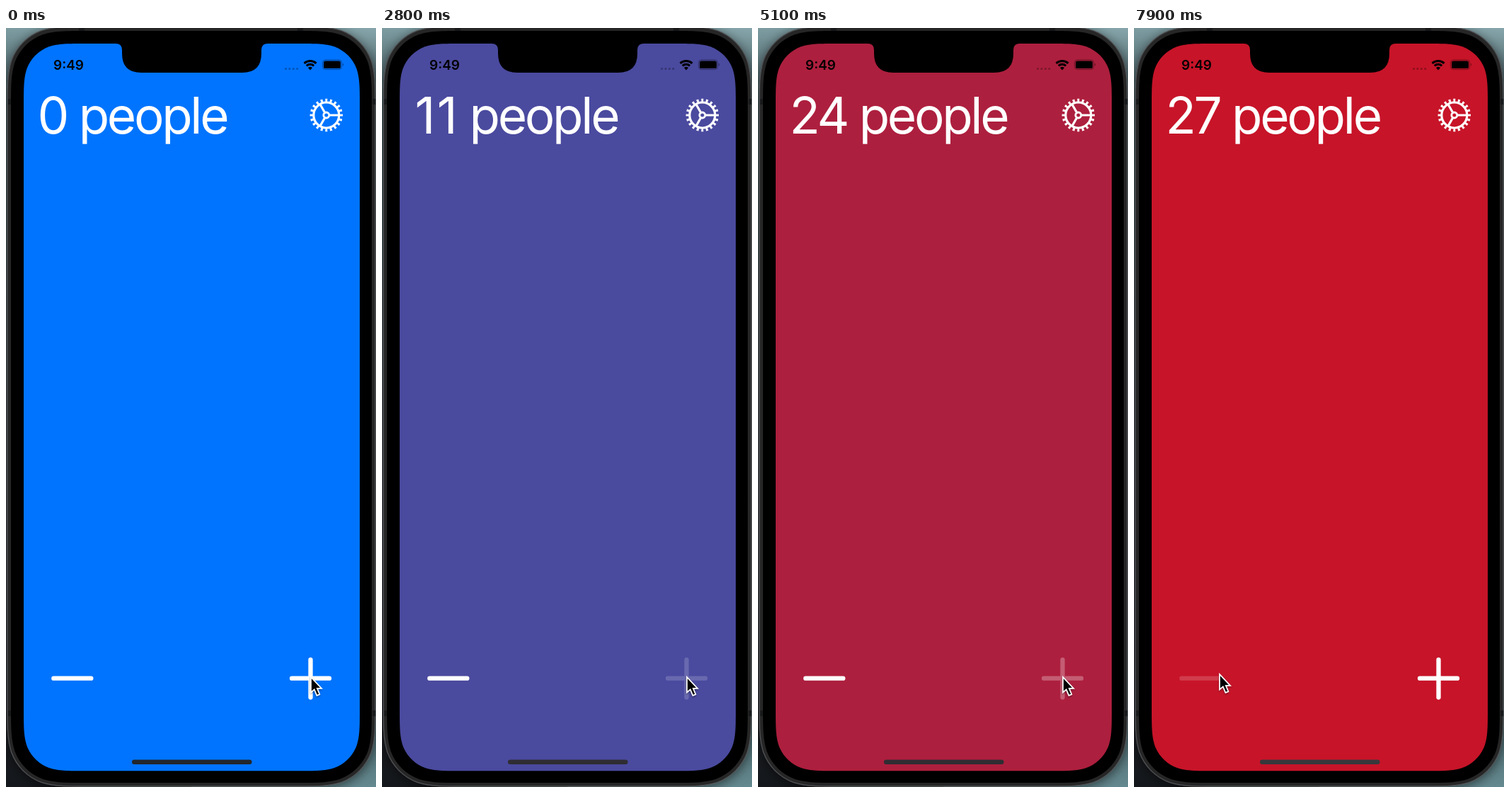
Recreate the animation shown at these times as an HTML page. Size 523 px wide and 1071 px high, loop 8 s.

```html
<!DOCTYPE html>
<html lang="en">
<head>
<meta charset="utf-8">
<style>
  html, body { margin: 0; width: 523px; height: 1071px; overflow: hidden; background: #000; }
  svg { display: block; }
  text { font-family: Inter, sans-serif; }
  #title { font-size: 71px; letter-spacing: -3.3px; fill: #fff; }
  #title tspan { letter-spacing: .3px; }
  #clock { font-size: 19px; font-weight: 600; }
  .white { stroke: #fff; fill: none; }
  .button { stroke-width: 6.3; stroke-linecap: round; }
</style>
</head>
<body>
<svg width="523" height="1071" viewBox="0 0 523 1071">
  <defs>
    <linearGradient id="left" x2="0" y2="1">
      <stop stop-color="#7d9da2"/><stop offset=".1" stop-color="#3a4c52"/>
      <stop offset=".6" stop-color="#3a3c42"/><stop offset="1" stop-color="#14171b"/>
    </linearGradient>
    <linearGradient id="right" x2="0" y2="1">
      <stop stop-color="#86a6ab"/><stop offset=".1" stop-color="#33464c"/>
      <stop offset=".8" stop-color="#2c3f45"/><stop offset="1" stop-color="#64898f"/>
    </linearGradient>
    <filter id="glow" x="-10%" y="-10%" width="120%" height="120%">
      <feDropShadow dx="0" dy="3" stdDeviation="8" flood-opacity=".55"/>
    </filter>
    <filter id="shadow" x="-50%" y="-50%" width="200%" height="200%">
      <feDropShadow dx="0" dy="1.5" stdDeviation="1.3" flood-opacity=".4"/>
    </filter>
  </defs>

  <rect width="262" height="1071" fill="url(#left)"/>
  <rect x="262" width="261" height="1071" fill="url(#right)"/>
  <path id="frame" fill="#262728" stroke="#505153" stroke-width="1.3" filter="url(#glow)"/>
  <path d="M103 0h8v4h-8zM412 0h8v4h-8zM3 100h4v8h-4zM518 100h4v8h-4zM3 963h4v8h-4zM518 963h4v8h-4z" fill="#18191a"/>
  <path id="bezel"/>
  <path id="screen"/>
  <path d="M155 21V22Q164 22 164 31V36Q164 63 191 63H334Q361 63 361 36V31Q361 22 370 22V21Z"/>

  <text id="clock" x="67" y="59">9:49</text>
  <path d="M395.5 57.5H413" stroke="#000" stroke-width="3.2" stroke-linecap="round" stroke-dasharray="0 5.4" opacity=".28"/>
  <g fill="none" stroke="#000" stroke-width="3">
    <path d="M421.5 49.9A12.5 12.5 0 0 1 438.5 49.9M424.8 53.4A7.6 7.6 0 0 1 435.2 53.4"/>
    <path d="M430 59.5L427 56.2A4.5 4.5 0 0 1 433 56.2Z" fill="#000" stroke="none"/>
  </g>
  <rect x="447.5" y="45" width="27" height="13.5" rx="4" fill="none" stroke="#000" opacity=".4"/>
  <rect x="449" y="46.5" width="24" height="10.5" rx="2.6"/>
  <path d="M476 49.5Q478 51.7 476 54Z" opacity=".45"/>

  <text id="title" x="44.5" y="149"></text>

  <g transform="translate(452.8 123)" class="white" stroke-width="3.2">
    <circle r="18"/>
    <circle r="21" stroke-width="4.4" pathLength="40" stroke-dasharray=".9 1.1" stroke-dashoffset=".45"/>
    <circle r="4" stroke-width="2.8"/>
    <path d="M5 0H17M-2.5 -4.3L-8.5 -14.7M-2.5 4.3L-8.5 14.7"/>
  </g>

  <path id="minus" class="white button" d="M67.3 917.7H120.3"/>
  <path id="plus" class="white button" d="M404 917.7H457M430.5 891.5V944.5"/>
  <rect id="home" x="178" y="1032.5" width="169.5" height="6.5" rx="3.2"/>
  <path id="cursor" d="M0 0V21.5L4.8 17.3L8.4 25.8L12.3 24.2L8.8 15.9H15Z" stroke="#fff" stroke-width="1.7" filter="url(#shadow)"/>
</svg>
<script>
const LOOP = 8000, STEP = 100, TAP = 190;
const plusTaps = { first: 720, count: 30 };
const minusTaps = { first: 7460, count: 4 };
// people, red, green, blue
const shades = [
  [0, 0, 116, 255], [3, 21, 103, 229], [11, 74, 74, 159], [16, 110, 56, 122],
  [24, 173, 31, 62], [27, 199, 20, 41], [29, 216, 15, 30], [30, 225, 12, 23]
];
const el = id => document.getElementById(id);
const clamp = (v, lo, hi) => Math.min(hi, Math.max(lo, v));
const mix = (a, b, k) => a + (b - a) * k;

// Rectangle with continuous-curvature corners.
function smoothRect(x, y, w, h, r) {
  const a = 1.528 * r, b = 1.088 * r, c = .868 * r, d = .631 * r, e = .075 * r, f = .373 * r, g = .169 * r;
  const corner = (ox, oy, sx, sy, flip) => {
    const points = [[0, a], [0, b], [0, c], [e, d], [g, f], [f, g], [d, e], [c, 0], [b, 0], [a, 0]];
    if (flip) points.reverse();
    const p = points.map(([px, py]) => `${ox + sx * px} ${oy + sy * py}`);
    return `L${p[0]}C${p.slice(1)}`;
  };
  return ('M' + corner(x, y, 1, 1) + corner(x + w, y, -1, 1, true) +
    corner(x + w, y + h, -1, -1) + corner(x, y + h, 1, -1, true) + 'Z').replace('ML', 'M');
}

const taps = (t, { first, count }) => clamp(Math.floor((t - first) / TAP) + 1, 0, count);

// A button dims while held and starts to fade back on each release.
function opacity(t, { first, count }) {
  const since = t - first, last = (count - 1) * TAP;
  if (since < -130) return 1;
  if (since < 0) return .18;
  if (since >= last) return clamp(.22 + (since - last) / 200, 0, 1);
  const phase = since % TAP;
  return phase < 50 ? .22 + phase * .006 : .17;
}

function shade(n) {
  const i = Math.max(1, shades.findIndex(s => s[0] >= n));
  const a = shades[i - 1], b = shades[i], k = (n - a[0]) / (b[0] - a[0]);
  return `rgb(${[1, 2, 3].map(c => Math.round(mix(a[c], b[c], k)))})`;
}

// The digit 1 gets wider side bearings than the font gives it.
const label = n => String(n).replace(/1/g, '<tspan dx="2">1</tspan>') + (n === 1 ? ' person' : ' people');

function draw(now) {
  const t = Math.floor(now % LOOP / STEP) * STEP;
  const people = taps(t, plusTaps) - taps(t, minusTaps);
  el('title').innerHTML = label(people);
  el('screen').setAttribute('fill', shade(people));
  el('plus').setAttribute('opacity', opacity(t, plusTaps));
  el('minus').setAttribute('opacity', opacity(t, minusTaps));
  el('home').setAttribute('fill', people > 26 ? '#38383c' : people > 10 ? '#2f2d33' : '#23262b');

  const k = clamp((t - 6450) / 750, 0, 1), ease = k * k * (3 - 2 * k);
  el('cursor').setAttribute('transform', `translate(${mix(431, 121, ease)} ${mix(916, 912, ease)})`);
  requestAnimationFrame(draw);
}

el('frame').setAttribute('d', smoothRect(2, -2, 520, 1072, 76));
el('bezel').setAttribute('d', smoothRect(7, 4, 510, 1061, 71));
el('screen').setAttribute('d', smoothRect(25, 22, 475, 1026.3, 57));
requestAnimationFrame(draw);
</script>
</body>
</html>
```
